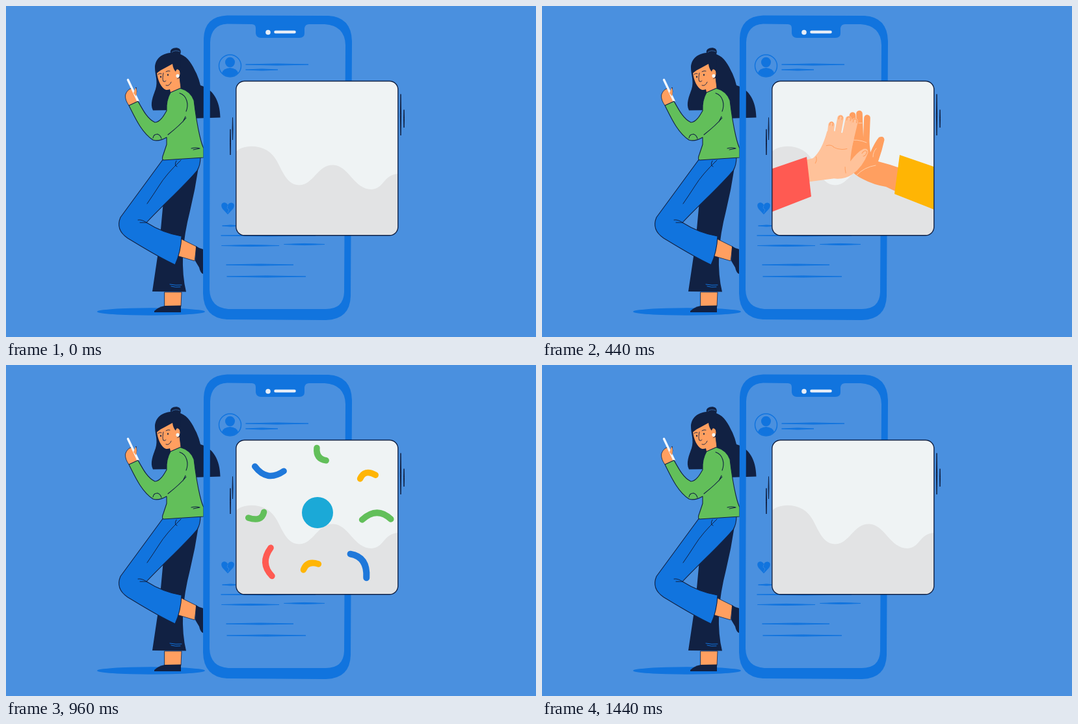
Recreate the animation shown at these times as an HTML page with a canvas. Size 815 by 509 pixels, loop 1680 ms.

```html
<!DOCTYPE html>
<html lang="en">
<head>
<meta charset="utf-8">
<title>High five</title>
<style>
html, body { margin: 0; width: 100%; height: 100%; overflow: hidden; background: #4a90df; }
canvas { display: block; width: 815px; height: 509px; }
</style>
</head>
<body>
<canvas id="stage" width="815" height="509"></canvas>
<script>
const ctx = document.getElementById('stage').getContext('2d');
const LOOP = 1680, STEP = 40, CLAP = 440, LEAVE = 1280, GONE = 1440;
const SKY = '#4a90df', BLUE = '#1174de', NAVY = '#112143', GREEN = '#62bf5a', RED = '#ff5a52',
      YELLOW = '#ffb504', SKIN = '#ff9f60', PALE = '#ffc29a', CARD = '#eff3f4', WHITE = '#f3f8ff';

const clamp = v => Math.max(0, Math.min(1, v));
const easeOut = x => 1 - (1 - clamp(x)) ** 2;

function shape(d, fill, stroke, width = 1.2, rule = 'nonzero') {
  const path = new Path2D(d);
  if (fill) { ctx.fillStyle = fill; ctx.fill(path, rule); }
  if (stroke) { ctx.strokeStyle = stroke; ctx.lineWidth = width; ctx.stroke(path); }
}
const line = (d, color, width) => shape(d, null, color, width);

function ellipse(x, y, rx, ry, fill) {
  ctx.beginPath();
  ctx.ellipse(x, y, rx, ry, 0, 0, Math.PI * 2);
  ctx.fillStyle = fill;
  ctx.fill();
}

// Thin stroke that narrows towards both ends
function taper(x1, y1, x2, y2, w, color) {
  const vertical = x1 === x2, mx = (x1 + x2) / 2, my = (y1 + y2) / 2;
  const a = vertical ? [mx - w, my] : [mx, my - w];
  const b = vertical ? [mx + w, my] : [mx, my + w];
  shape(`M${x1} ${y1}Q${a} ${x2} ${y2}Q${b} ${x1} ${y1}Z`, color, color, 1);
}

function drawWoman() {
  ellipse(223, 470, 83, 5.8, BLUE);

  // hair
  shape('M253 72C251 65 262 62 267 66Q270 69 268 74C281 79 286 90 293 104Q297 113 299 122C319 128 329 146 329.5 171.500L283 173L264 160L226 160.500C221 151 226 139 230 128C234 116 229 105 229 95C229 82 239 73 253 72Z', NAVY);
  line('M255 71Q260 67 267 70', SKY, .6);

  // standing leg
  shape('M244 440H270L269 462H244Z', SKIN, NAVY, .8);
  shape('M228 469Q234 463 244 461L269 460.500V471H228Z', NAVY);
  shape('M242 300L296 248Q291 282 283 315Q274 350 272 382Q271 416 277 439.500L225 439L236 365Z', NAVY);
  line('M252 428Q261 430 270 429M254 431Q260 433 268 432', BLUE, 1);

  // bent leg
  shape('M269 358L293 370L290 392L263 384Z', SKIN, NAVY, .8);
  shape('M292 369Q297 373 303 374V412Q299 411 297 402L291 392Z', NAVY);
  shape('M242 235L299 232Q299 245 294 253C272 279 242 305 216 333Q241 349 270 354Q269 378 260 398C234 386 210 371 187 357Q168 344 176 325Z', BLUE, NAVY, 1.1);
  line('M269 237Q246 259 235 277Q226 291 217 304M262 238Q258 245 263 247M203 329Q209 328 216 333L206 333', NAVY, 1);

  // face and neck
  shape('M250 118L267 110L269 127L253 134Z', SKIN, NAVY, .8);
  shape('M232 102C233 113 238 126 246 129C253 130 260 124 263 112Q269 108 267 100Q264 95 260 99L256 86L240 91Z', SKIN);
  shape('M231 104Q238 98 245 95L256 89Q257 97 261 101Q262 95 269 96L268 83L250 77L231 86Z', NAVY);
  line('M242 103Q240 112 242 116Q245 117 246 115M246 122Q251 124 254 117M234 105Q236 103 239 104M246 101Q249 99 252 100', NAVY, .9);
  ellipse(238, 109, 1, 1.4, NAVY);
  ellipse(249, 106, 1, 1.4, NAVY);
  ellipse(264, 107.5, 2.5, 2.7, WHITE);

  // holding hand and stylus
  shape('M189 153Q183 145 183.500 137Q186 129 192 127Q197 131 198 134L200 125Q202 131 199.500 139L203 147Z', SKIN, NAVY, .8);
  line('M187.500 113.500L203 146', WHITE, 3.4);
  shape('M196 134L199 126Q202 128 200 139Z', SKIN);

  // sweater
  shape('M253 133L268 126.500Q284 131 289 145Q293 179 298 200Q301 213 304 219V233L242 237Q239 235 242 228L247 213V202Q235 209 226 206C209 195 199 173 189 153L203 146.500C211 161 218 174 229 179C237 179 243 168 247 161Q246 145 253 133Z', GREEN, NAVY, 1.1);
  line('M267 134C279 138 281 152 277 162M277 172Q268 183 249 198M276 170L272 178M226 203Q227 197 233 197Q238 199 239 204M285 219Q292 217 298 219L288 221', NAVY, 1.1);
}

function drawPhone() {
  shape('M340 14.500L496 15Q531 17 532 54L530 446Q529 482 492 483L340 482Q304 480 303 442L304 50Q305 16 340 14.500Z' +
        'M340 27.500L378 28Q384 28 384 34V42Q385 49 392 49H451Q459 49 459 42V34Q460 28 466 28H490Q521 30 522 60L520 440Q519 466 492 466H342Q314 464 313 436L314 56Q315 29 340 27.500Z', BLUE, null, 0, 'evenodd');
  ellipse(403, 40.5, 3.8, 3.8, '#e6edf7');
  line('M414.500 40H443.500', '#e6edf7', 4.6);

  line('M361.500 92A17 17 0 1 1 327.500 92A17 17 0 1 1 361.500 92', BLUE, 1.5);
  ellipse(344.5, 86.5, 7.5, 7.8, BLUE);
  shape('M332 103Q334 96 344.500 95Q355 96 357 103Q351 108.500 344.500 108.500Q337 108 332 103Z', BLUE);
  shape('M341 320.500L333 312C327 302 338 299 341 306C345 299 355 303 349 312Z', BLUE);
  line('M341 307L340 311L343 313L341 318', SKY, .6);

  const rows = [[369, 90, 465], [369, 98, 418], [333, 338, 358], [331, 353, 476], [332, 368.5, 420],
                [428, 366.5, 490], [339, 398, 442], [340, 416, 461]];
  for (const [x, y, end] of rows) taper(x, y, end, y, 2.2, BLUE);

  taper(607, 136, 607, 199, 1.2, NAVY);
  taper(612, 160, 612, 187, .8, NAVY);
  taper(348.5, 172, 348.5, 206, .8, NAVY);
  taper(345, 190, 345, 229, 1, NAVY);
}

const cardPath = new Path2D();
cardPath.roundRect(353.8, 115.5, 249, 237.2, 13);

function grow(x, y, scale, turn, draw) {
  if (scale <= 0) return;
  ctx.save();
  ctx.translate(x, y);
  ctx.rotate(turn);
  ctx.scale(scale, scale);
  ctx.translate(-x, -y);
  draw();
  ctx.restore();
}

// [color, width, start time, centre, curve]
const confetti = [
  ['#1f78da', 9.5, 600, [404, 164], 'M382 158Q403 181 427 161'],
  [GREEN, 9.5, 600, [484, 138], 'M477 128Q477 145 493 146'],
  [YELLOW, 9.5, 610, [556, 171], 'M545 176Q550 160 568 168'],
  [GREEN, 9.5, 610, [570, 234], 'M548 240Q569 217 592 235'],
  [GREEN, 9.5, 700, [384, 232], 'M373 236Q394 241 396 225'],
  [RED, 9.5, 705, [405, 303], 'M405 281Q390 306 411 324'],
  [YELLOW, 9.5, 705, [469, 310], 'M458 316Q462 301 480 305'],
  ['#1f78da', 10, 705, [543, 308], 'M528 292Q555 294 556 326']
];

function pose(clap, drift, d, draw) {
  const near = Math.max(0, 1 - d), far = Math.max(0, d - 1);
  ctx.save();
  ctx.translate(clap[0] * near + drift[0] * far, clap[1] * near + drift[1] * far);
  draw(near);
  ctx.restore();
}

function rightHand() {
  line('M508 192L511 226M514.500 170L519 226M525 167.500L527 226M537 174L535 226', SKIN, 9.6);
  shape('M503 206Q510 201 523 204L540 208L542 227Q549 211 555 204Q563 201 563.500 208Q560 224 554 241L572 246L650 272V320L566 280Q547 277 530 268Q505 256 504 232Z', SKIN);
  line('M507 209Q522 206 536 212M521 262Q532 250 550 247M546 234Q546 226 551 221M511 186L514 186M517 183L521 183M524 182L529 182', '#ffd0ad', 1);
}

function leftHand() {
  line('M403 196L406 226M414.500 183L416 226M427 182L427 226M437 183L436 226', PALE, 9.8);
  shape('M398.500 207Q410 202 441 207Q441 232 443 245Q451 228 459 222Q466 219 467 226Q464 249 450 264Q441 274 424 276L390 288L366 295V262L386 252Q397 238 398.500 207Z', PALE);
  line('M402 229Q409 225 414 229Q424 232 434 227M390 249Q393 253 391 259M437 255Q438 260 440 264', SKIN, 1);
  line('M400.500 197V193Q403 190 405 193V197M412 185V181Q415 178 417 181V185M424.500 184V180Q427 177 430 180V184M434.500 185V181Q437 178 440 181V185M458 229Q461 222 465 225Q465 231 461 233', SKIN, 1.2);
}

function drawHands(t) {
  const d = t < CLAP ? 5 * ((CLAP - t) / 240) ** 1.8 : ((t - CLAP) / 160) ** 1.866;
  if (d > 8) return;
  pose([-37, -2], [20.5, 1.5], d, rightHand);
  pose([-22, -2], [20.5, 1.5], d, () => shape('M572 231L650 258V325L564 291Z', YELLOW));
  pose([27, -18], [-23, 5.5], d, near => grow(388, 270, 1, near * .21, leftHand));
  pose([24, -5], [-23, 5.5], d, () => shape('M383 237L390 298L310 329V262Z', RED));
}

function drawCard(t) {
  ctx.save();
  ctx.fillStyle = CARD;
  ctx.fill(cardPath);
  ctx.clip(cardPath);
  shape('M353 225C362 213 397 210 413 233C424 248 429 275 451 275.500C473 275 479 244 503 244.500C527 245 535 282 562 282C582 281 579 260 603 258V354H353Z', '#e2e3e4');

  const leave = 1 - clamp((t - LEAVE) / (GONE - LEAVE)) ** 2;
  grow(479, 227, easeOut((t - 520) / 200) * leave, 0, () => ellipse(479, 227, 24, 24, '#1ba9d7'));
  const turn = .17 * (1160 - t) / 360;
  for (const [color, width, start, [x, y], curve] of confetti)
    grow(x, y, easeOut((t - start) / 220) * leave, turn, () => line(curve, color, width));

  drawHands(t);
  ctx.restore();
  ctx.strokeStyle = NAVY;
  ctx.lineWidth = 1.4;
  ctx.stroke(cardPath);
}

function frame(now) {
  const t = Math.floor((now % LOOP) / STEP) * STEP;
  ctx.lineCap = ctx.lineJoin = 'round';
  ctx.fillStyle = SKY;
  ctx.fillRect(0, 0, 815, 509);
  drawWoman();
  drawPhone();
  drawCard(t);
}

const begin = performance.now();
function loop() {
  frame(performance.now() - begin);
  requestAnimationFrame(loop);
}
loop();
</script>
</body>
</html>
```
